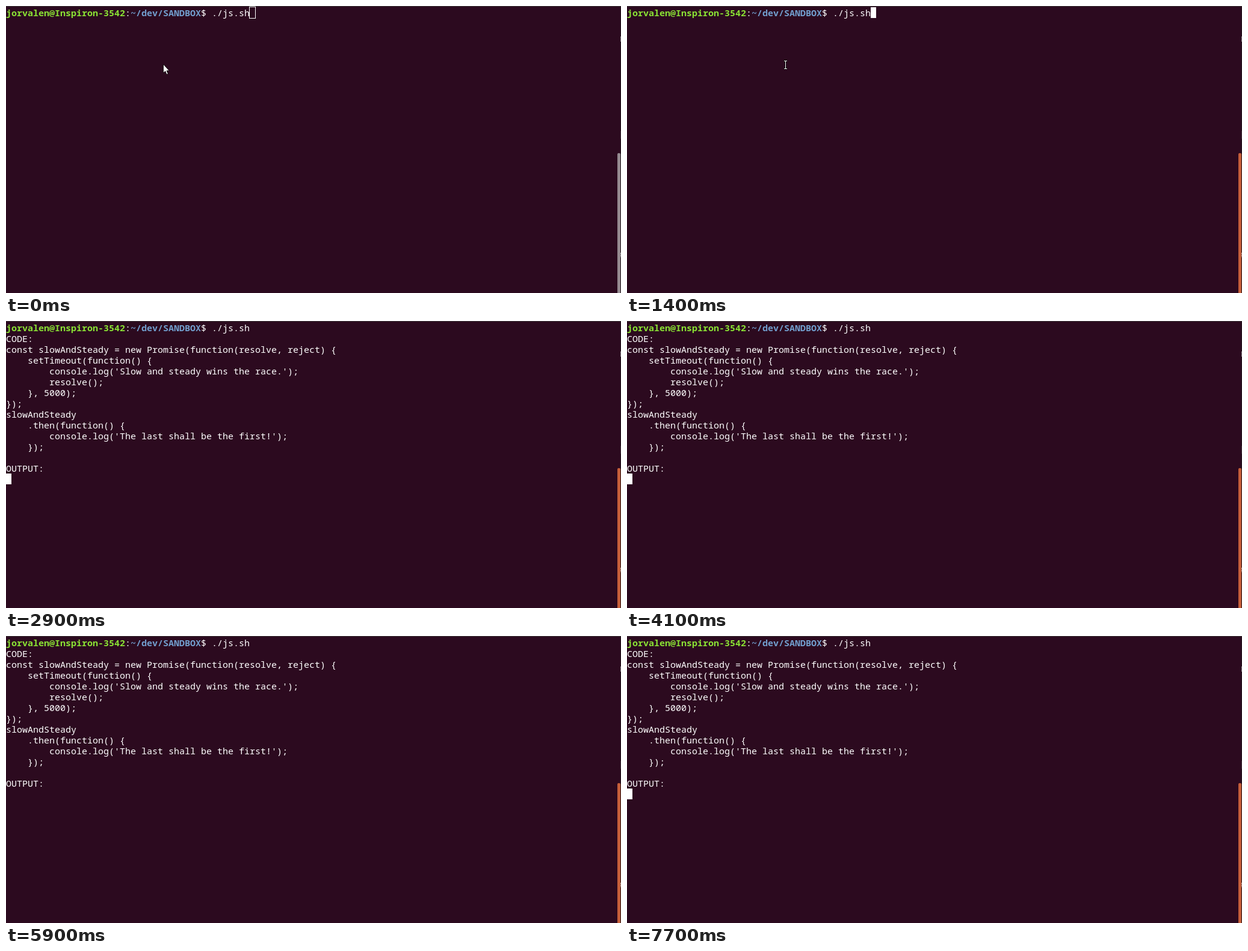
Recreate the animation shown at these times as an HTML page. Size 1022 by 478 pixels, loop 8000 ms.

```html
<!DOCTYPE html>
<html lang="en">
<head>
<meta charset="utf-8">
<title>Terminal session</title>
<style>
  html, body { margin: 0; width: 100%; height: 100%; overflow: hidden; background: #2c0a1f; }
  svg { display: block; width: 1022px; height: 478px; }
  text { font: 15px "Noto Sans Mono", "DejaVu Sans Mono", monospace; fill: #fff; white-space: pre; }
  .user { fill: #8ae234; font-weight: bold; }
  .path { fill: #729fcf; font-weight: bold; }
</style>
</head>
<body>
<svg viewBox="0 0 1022 478">
  <rect width="1022" height="478" fill="#2c0a1f"/>
  <rect width="1022" height="1" fill="#3d3639"/>
  <rect x="1021" y="1" width="1" height="477" fill="#271a20"/>
  <path d="M1021.5 51v8M1021.5 411v7" stroke="#bbb" stroke-dasharray="2 1"/>
  <path d="M1021.5 208v13" stroke="#44363d"/>
  <path id="bar" d="M1016 478V247q0-2 2-2h1q2 0 2 2V478z"/>
  <g id="lines"></g>
  <rect id="hollow" x="404.5" y="1.5" width="10" height="19" fill="none" stroke="#fff"/>
  <rect id="block" width="9" height="18" fill="#fff"/>
  <path id="arrow" d="M261.5 97v14.5l3.2-3 2.3 5.4 2.3-1-2.3-5.1h4.2z" fill="#fff" stroke="#000" stroke-width=".8"/>
  <g id="beam" fill="none">
    <path d="M260.5 91.5h6M263.5 91v14M260.5 104.5h6" stroke="#000" stroke-width="2.6"/>
    <path d="M261 91.5h5M263.5 91v14M261 104.5h5" stroke="#fff"/>
  </g>
</svg>
<script>
const LOOP = 8000, CELL = 9, ROW = 18;
const FOCUS = 1300, HOVER = 1400, RUN = 2900, BLINK = 600;

const prompt = [["jorvalen@Inspiron-3542", "user"], [":", ""], ["~/dev/SANDBOX", "path"], ["$ ./js.sh", ""]];
const output = `CODE:
const slowAndSteady = new Promise(function(resolve, reject) {
    setTimeout(function() {
        console.log('Slow and steady wins the race.');
        resolve();
    }, 5000);
});
slowAndSteady
    .then(function() {
        console.log('The last shall be the first!');
    });

OUTPUT:`.split("\n");

const el = id => document.getElementById(id);
const show = (id, on) => el(id).setAttribute("visibility", on ? "visible" : "hidden");

function addText(parent, str, col, row, cls = "") {
  const node = document.createElementNS("http://www.w3.org/2000/svg", "text");
  node.setAttribute("x", col * CELL);
  node.setAttribute("y", 17 + row * ROW);
  node.setAttribute("class", cls);
  node.textContent = str;
  parent.append(node);
}

let col = 0;
for (const [str, cls] of prompt) {
  addText(el("lines"), str, col, 0, cls);
  col += str.length;
}

const result = document.createElementNS("http://www.w3.org/2000/svg", "g");
result.id = "result";
el("lines").append(result);
output.forEach((line, i) => {
  const text = line.trimStart();
  addText(result, text, line.length - text.length, i + 1);
});

function draw(t) {
  const ran = t >= RUN;
  const blinkStart = ran ? RUN : FOCUS;
  const lit = Math.floor((t - blinkStart) / BLINK) % 2 === 0;

  show("arrow", t < 100);
  show("beam", t >= 100 && !ran);
  show("hollow", t < FOCUS);
  show("block", t >= FOCUS && lit);
  show("result", ran);
  el("block").setAttribute("x", ran ? 0 : col * CELL);
  el("block").setAttribute("y", 2 + (ran ? (output.length + 1) * ROW : 0));
  el("bar").setAttribute("fill", t < HOVER ? "#958a90" : "#c65f3a");
}

const start = performance.now();
function tick() {
  draw((performance.now() - start) % LOOP);
  requestAnimationFrame(tick);
}
tick();
</script>
</body>
</html>
```
